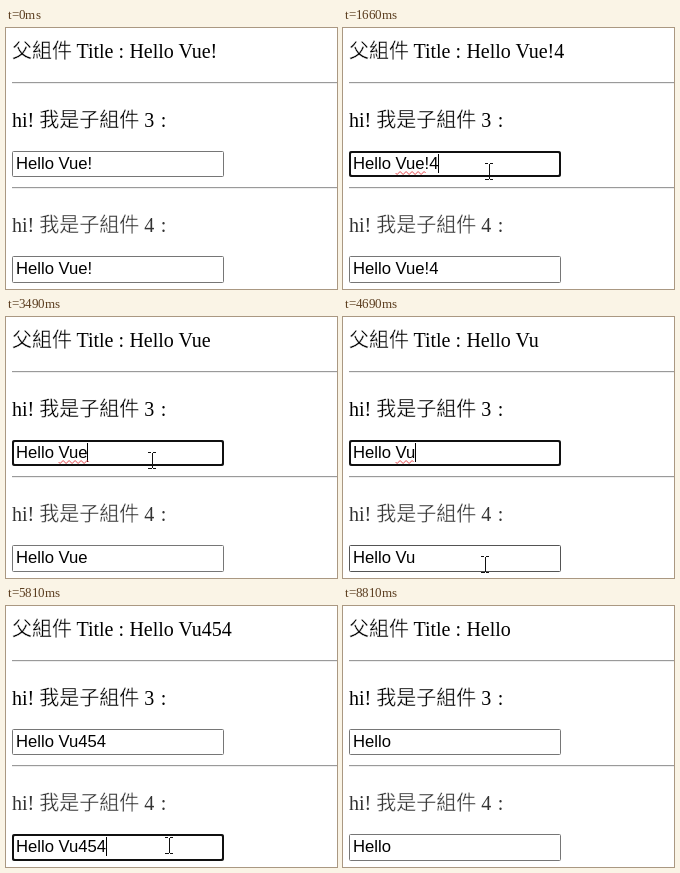
Recreate the animation shown at these times as an HTML page. Size 331x261 px, loop 8940 ms.

```html
<!DOCTYPE html>
<html lang="zh-Hant">
<head>
<meta charset="utf-8">
<title>父子組件</title>
<style>
  html, body { margin: 0; width: 100%; height: 100%; overflow: hidden; background: #fff; }
  svg { display: block; width: 331px; height: 261px; }
  text { white-space: pre; fill: #000; }
  .serif { font: 20px "Liberation Serif", "Times New Roman", serif; }
  /* The white outline thins the strokes to a lighter weight. */
  .cjk {
    font: 300 20px "Noto Sans CJK TC", "Noto Sans CJK", sans-serif;
    stroke: #fff; stroke-width: .35;
  }
  .value { font: 16.667px "Liberation Sans", Arial, sans-serif; }
  .soft { fill: #333; }
  .box { fill: #fff; stroke: #767676; }
  .box.hover { stroke: #545454; }
  .ring { fill: none; stroke: #101010; stroke-width: 2; }
  .wave { fill: none; stroke: #e5484d; }
  .beam { fill: none; stroke: #111; }
</style>
</head>
<body>
<svg id="stage" viewBox="0 0 331 261"></svg>
<script>
const LOOP = 8940;
const stage = document.getElementById('stage');

function add(tag, attrs, text) {
  const el = document.createElementNS('http://www.w3.org/2000/svg', tag);
  for (const key in attrs) el.setAttribute(key, attrs[key]);
  if (text) el.textContent = text;
  stage.append(el);
  return el;
}
const label = (cls, x, y, text) => add('text', { class: cls, x, y }, text);
const show = (el, on) => el.setAttribute('visibility', on ? 'visible' : 'hidden');

function rule(y) {
  add('rect', { x: 6, y, width: 325, height: 1, fill: '#9a9a9a' });
  add('rect', { x: 6, y: y + 1, width: 325, height: 1, fill: '#eee' });
}

function child(y, number, height, tone) {
  rule(y);
  const base = y + 45;
  label('serif ' + tone, 6, base, 'hi!');
  label('cjk ' + tone, 33.2, base, '我是子組件');
  label('serif ' + tone, 138.2, base, number);
  label('serif ' + tone, 154.8, base, ':');
  const top = y + 69;
  return {
    top, height,
    box: add('rect', { class: 'box', x: 6.5, y: top + .5, width: 211, height: height - 1, rx: 1 }),
    ring: add('rect', { class: 'ring', x: 7, y: top + 1, width: 210, height: height - 2, rx: 2 }),
    value: label('value', 10, top + 18, ''),
    caret: add('rect', { y: top + 3, width: 1, height: 19 })
  };
}

label('cjk', 6, 30, '父組件');
label('serif', 70.4, 30, 'Title :');
const title = label('serif', 123.4, 30, '');
const fields = [child(54, '3', 26, ''), child(159, '4', 27, 'soft')];
const wave = add('path', { class: 'wave' });
const halo = add('circle', { r: 14.7, fill: '#ffff46', 'fill-opacity': .72, style: 'mix-blend-mode:multiply' });
const beam = add('path', {
  class: 'beam',
  d: 'M-4 -7.5H-1M1 -7.5H4M.5 -7V8M-4 8.5H0M1 8.5H4'
});

// Each track is a list of [start time, value], held until the next entry.
const words = [
  [0, 'Hello Vue!'],
  [1660, 'Hello Vue!4'], [1800, 'Hello Vue!465'], [1930, 'Hello Vue!4654'],
  [2070, 'Hello Vue!46546'], [2200, 'Hello Vue!465465'],
  ...erase('Hello Vue!465465', 3010, 80, 7),
  [3690, 'Hello Vu'],
  [5480, 'Hello Vu4'], [5610, 'Hello Vu45'], [5810, 'Hello Vu454'], [6010, 'Hello Vu4545'],
  ...erase('Hello Vu4545', 6870, 67.5, 5),
  [7340, 'Hello ']
];
const focus = [[0, -1], [660, 0], [4760, 1], [8810, -1]];
const blink = [
  [0, true], [1200, false], [1660, true], [2730, false], [3010, true],
  [5280, false], [5480, true], [6540, false], [6870, true],
  [7620, false], [8150, true], [8680, false]
];
const pointer = [
  [0, null], [110, [241, 252]], [190, [215, 225]], [260, [185, 190]],
  [330, [160, 160]], [400, [146, 143]],
  [4280, [146, 148]], [4350, [147, 165]], [4420, [147, 190]], [4490, [145, 215]],
  [4560, [143, 238]], [4620, [141, 250]], [4690, [142, 247]], [4760, [163, 239]],
  [8080, null]
];
const press = [[0, false], [600, true], [730, false], [4760, true], [4890, false]];

function erase(text, start, gap, count) {
  return Array.from({ length: count }, (_, i) => [start + i * gap, text.slice(0, -1 - i)]);
}

function at(track, t) {
  let value = track[0][1];
  for (const [start, next] of track) if (t >= start) value = next;
  return value;
}

function drawWave(value, text) {
  const start = 10 + value.getSubStringLength(0, 6);
  const end = 10 + value.getSubStringLength(0, Math.min(9, text.length));
  let d = `M${start} 145`;
  for (let x = start, up = false; x + 3 <= end + 1; x += 3, up = !up) {
    d += `q1.5 ${up ? -3 : 3} 3 0`;
  }
  wave.setAttribute('d', d);
}

let lastText;
function draw(t) {
  const text = at(words, t);
  const active = at(focus, t);
  const spot = at(pointer, t);

  if (text !== lastText) {
    title.textContent = text;
    for (const { value, caret } of fields) {
      value.textContent = text;
      caret.setAttribute('x', Math.floor(10 + value.getComputedTextLength()));
    }
    if (text.length > 6) drawWave(fields[0].value, text);
    lastText = text;
  }

  fields.forEach(({ top, height, box, ring, caret }, i) => {
    const over = spot && spot[0] < 218 && spot[1] >= top && spot[1] < top + height;
    box.classList.toggle('hover', Boolean(over));
    show(ring, active === i);
    show(caret, active === i && at(blink, t));
  });
  show(wave, active === 0);

  show(beam, spot);
  show(halo, spot && at(press, t));
  if (spot) {
    beam.setAttribute('transform', `translate(${spot})`);
    halo.setAttribute('transform', `translate(${spot[0] - 1.3} ${spot[1] - 1})`);
  }
}

const began = performance.now();
function tick() {
  draw((performance.now() - began) % LOOP);
  requestAnimationFrame(tick);
}
tick();
</script>
</body>
</html>
```
